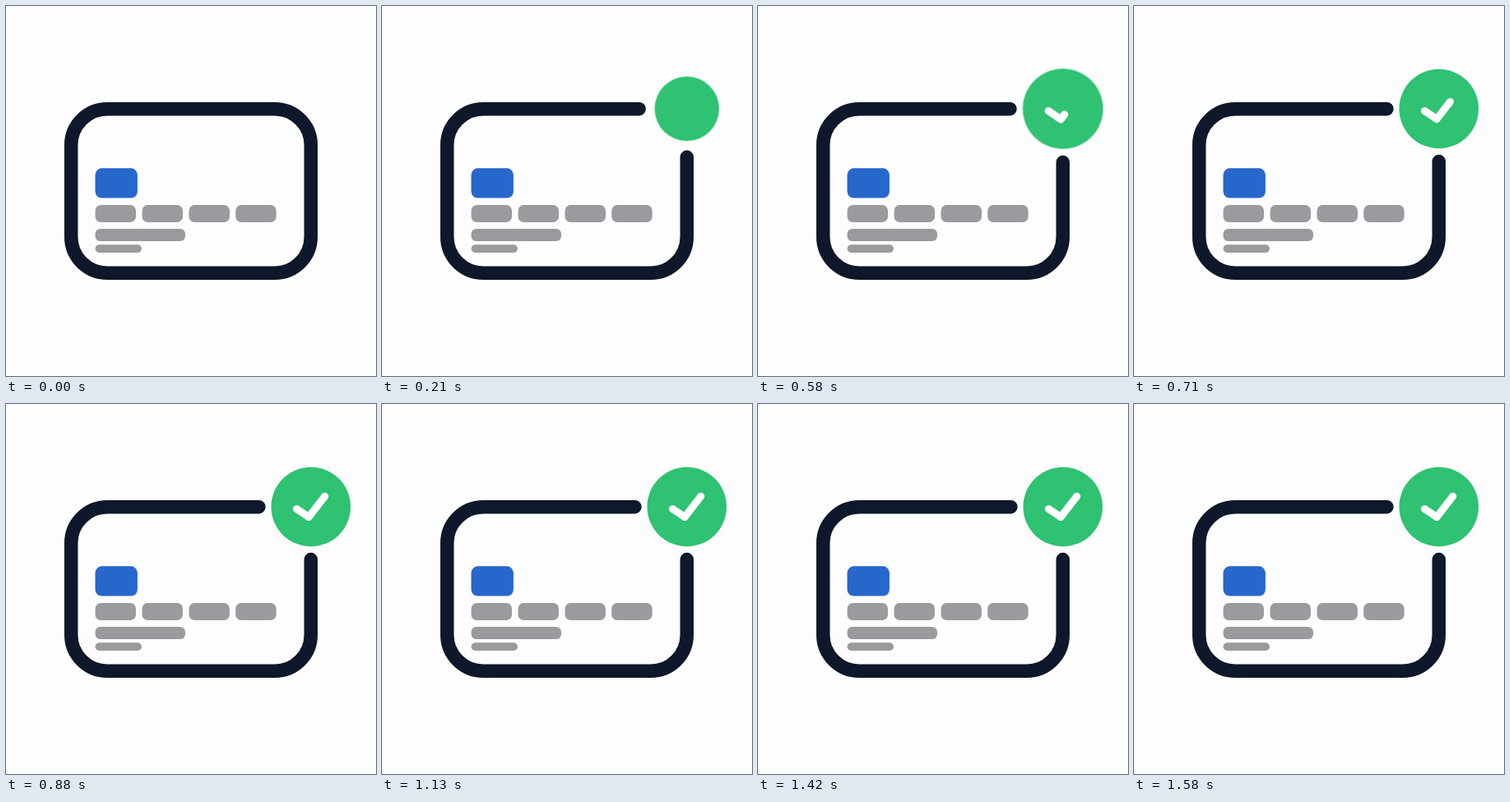
These frames come from a looping animation (450 px wide and 450 px high, 1.62 s). An HTML page:

```html
<!DOCTYPE html>
<html lang="en">
<head>
<meta charset="utf-8">
<title>Card approved</title>
<style>
  html, body { margin: 0; width: 100%; height: 100%; overflow: hidden; background: #fdfdfd; }
  svg { display: block; width: 100vw; height: 100vh; }
  .line { fill: none; stroke-linecap: round; stroke-linejoin: round; }
  #frame { stroke: #0f172a; stroke-width: 16.5; }
  #tick { stroke: #fff; stroke-width: 9; }
  #badge { transform-origin: 370.8px 125px; }
</style>
</head>
<body>
<svg viewBox="0 0 450 450">
  <path id="frame" class="line" d="M357.9 138.1A44 44 0 0 1 370.8 169.2V280.8A44 44 0 0 1 326.8 324.8H123.2A44 44 0 0 1 79.2 280.8V169.2A44 44 0 0 1 123.2 125.2H326.8A44 44 0 0 1 357.9 138.1"/>
  <rect x="108.5" y="197.3" width="51.4" height="36.2" rx="8" fill="#2767cc"/>
  <g fill="#9b9a9f">
    <rect x="108.5" y="242" width="49.5" height="21" rx="7"/>
    <rect x="165.5" y="242" width="49.5" height="21" rx="7"/>
    <rect x="222.5" y="242" width="49.5" height="21" rx="7"/>
    <rect x="279.2" y="242" width="49.5" height="21" rx="7"/>
    <rect x="108.5" y="271" width="109.5" height="15" rx="6"/>
    <rect x="108.5" y="290.2" width="56.5" height="9.8" rx="4.9"/>
  </g>
  <g id="badge">
    <circle cx="370.8" cy="125" r="48.3" fill="#2ec272"/>
    <path id="tick" class="line" d="M353.4 127.6L368.2 137.6L387.7 112.2"/>
  </g>
</svg>
<script>
const LOOP = 1620;
const EASE = 'cubic-bezier(.33, 0, .67, 1)';
const $ = id => document.getElementById(id);

// steps: [time in ms, value]; style turns a value into CSS properties
function play(el, steps, style) {
  const frames = steps.map(([t, v]) => ({ offset: t / LOOP, easing: EASE, ...style(v) }));
  el.animate(frames, { duration: LOOP, iterations: Infinity });
}

const frame = $('frame'), tick = $('tick'), badge = $('badge');
const around = frame.getTotalLength(), stroke = tick.getTotalLength();

play(badge, [[0, 0], [340, 1.2], [620, 1], [LOOP, 1]], s => ({ transform: `scale(${s})` }));

// half of the gap, measured along the outline from the middle of the corner
play(frame, [[0, 0], [340, 72.6], [620, 54.3], [LOOP, 54.3]], gap => ({
  strokeDasharray: `${around - 2 * gap}px ${around}px`,
  strokeDashoffset: `${-gap}px`
}));

play(tick, [[0, 0], [360, 0], [800, 1], [LOOP, 1]], p => ({
  strokeDasharray: `${p * stroke + 0.01}px 100px`
}));
play(tick, [[0, 0], [360, 0], [360, 1], [LOOP, 1]], o => ({ opacity: o }));
</script>
</body>
</html>
```
